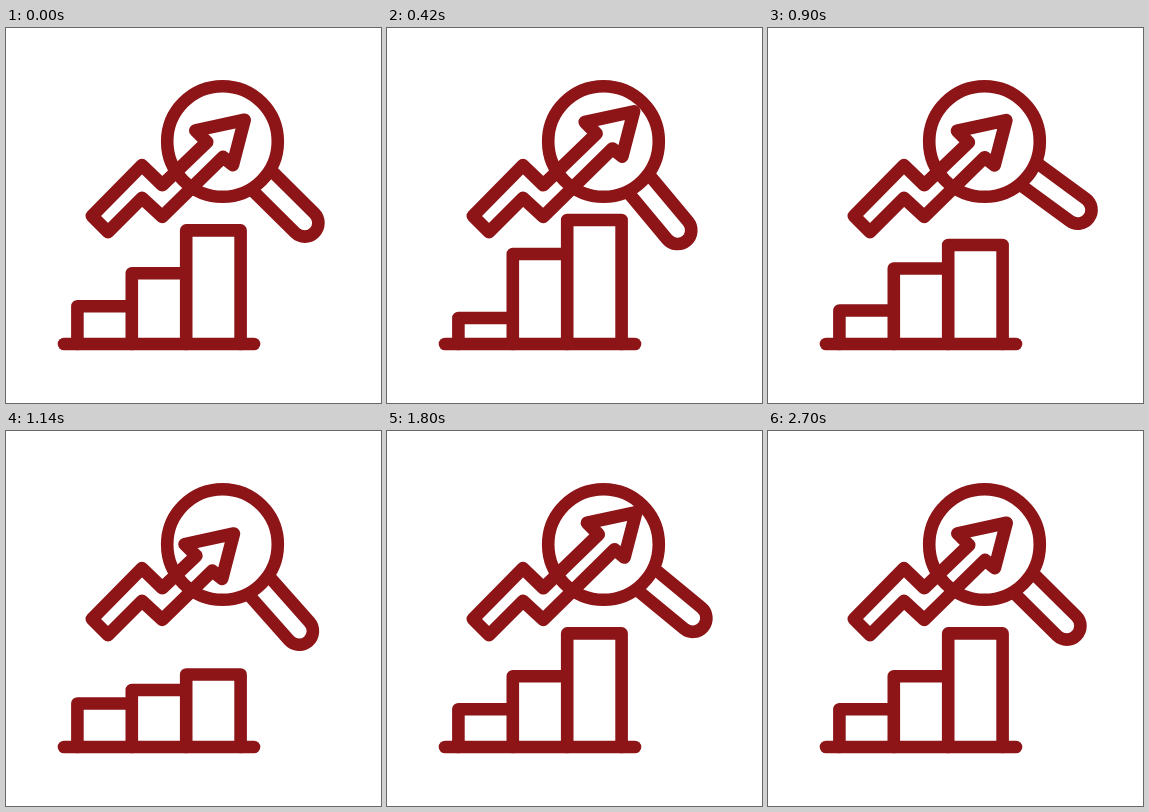
An HTML page for the animation above (3.03 s loop, 375 px wide and 375 px high).

```html
<!DOCTYPE html>
<html lang="en">
<head>
<meta charset="utf-8">
<title>Growth analysis icon</title>
<style>
  html, body { margin: 0; width: 100%; height: 100%; overflow: hidden; background: #fff; }
  svg { display: block; width: 100vw; height: 100vh; }
  g { fill: none; stroke: #8d1417; stroke-width: 12.6; stroke-linecap: round; stroke-linejoin: round; }
</style>
</head>
<body>
<svg viewBox="0 0 375 375">
  <g>
    <path d="M58 316H248"/>
    <path id="bars"/>
    <path id="arrow" stroke-width="13"/>
    <circle cx="216.5" cy="113.5" r="55.3"/>
    <path id="handle" d="M272 99.8H332.2a13.7 13.7 0 0 1 0 27.4H272"/>
  </g>
</svg>
<script>
  const LOOP = 3030, STEP = 30, BEAT = 600, SWING = 480;
  const FLOOR = 316, LEFT = 71.4, WIDTH = 54.4;
  const [bars, arrow, handle] = ['bars', 'arrow', 'handle'].map(id => document.getElementById(id));

  const ease = p => (1 - Math.cos(Math.PI * p)) / 2;

  // Eases through evenly spaced values, then rests on the last one.
  function through(t, gap, values) {
    const i = Math.floor(t / gap);
    if (i >= values.length - 1) return values[values.length - 1];
    return values[i] + (values[i + 1] - values[i]) * ease(t / gap - i);
  }

  // Top edge of each bar: at rest, on the first beat, on the second.
  const tops = [[278.3, 293, 272], [245.3, 221, 260], [202.4, 189.3, 244.8]];

  function drawBars(t) {
    const d = tops.map(([rest, first, second], i) => {
      const x = LEFT + WIDTH * i;
      const y = through(t, BEAT, [rest, first, second, rest]);
      return `M${x} ${FLOOR}V${y}H${x + WIDTH}`;
    });
    bars.setAttribute('d', d.join('') + `V${FLOOR}`);
  }

  // The head slides along the diagonal while the zigzag tail stays put.
  function drawArrow(t) {
    const s = through(t, BEAT, [0, 10.6, -11.3, 10.6, 0]);
    arrow.setAttribute('d',
      `M86 188L136 137.3L156.3 157L${201 + s} ${114 - s}` +
      `l-11.5 -11.5l49 -10.6l-11.7 45l-9.8 -7.8` +
      `L156.3 188.7L136 170L102 204Z`);
  }

  // The swing dies down around 45 degrees and starts partway through a turn.
  function drawHandle(t) {
    const angle = through(t + 180, SWING, [41, 53, 33.7, 51, 39.2, 48.1, 44.7]);
    handle.setAttribute('transform', `rotate(${angle} 216.5 113.5)`);
  }

  const start = performance.now();
  function tick() {
    const now = (performance.now() - start) % LOOP;
    const t = Math.floor(now / STEP) * STEP;
    drawBars(t);
    drawArrow(t);
    drawHandle(t);
    requestAnimationFrame(tick);
  }
  tick();
</script>
</body>
</html>
```
